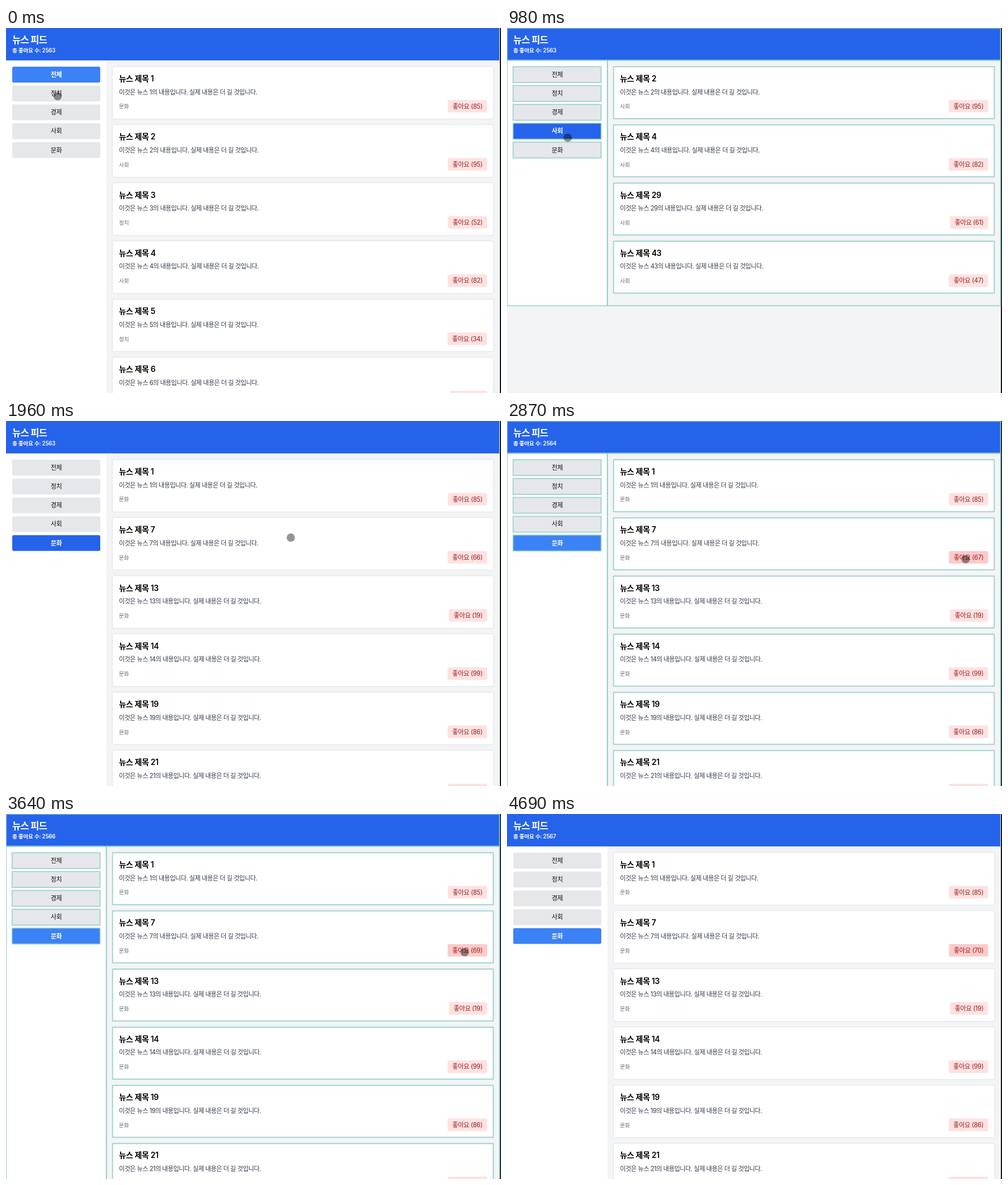
An HTML page that plays this animation: 872 by 642 pixels, repeating every 5.11 s.

```html
<!DOCTYPE html>
<html lang="ko">
<head>
<meta charset="utf-8">
<style>
html, body { margin: 0; width: 100%; height: 100%; overflow: hidden; background: #f3f4f6; }
svg { display: block; width: 872px; height: 642px; }
text { font-family: Inter, "Noto Sans CJK KR", "Noto Sans CJK", "Noto Sans KR", sans-serif; font-size: 11.04px; letter-spacing: -.025em; }
.logo { font-size: 16.5px; font-weight: 700; letter-spacing: -.04em; fill: #fff; }
.total { font-size: 9.66px; font-weight: 600; fill: #fff; }
.tab { text-anchor: middle; font-weight: 500; fill: #111; }
.tab.on { font-weight: 600; fill: #fff; }
.head { font-size: 13.8px; font-weight: 600; fill: #000; }
.body { letter-spacing: -.042em; fill: #303a48; }
.cat { font-size: 9.66px; fill: #646b78; }
.like { fill: #991b1b; }
.card { fill: #fff; filter: drop-shadow(0 .7px .9px rgba(0,0,0,.16)); }
.trace { fill: none; stroke: #8fcfc7; stroke-opacity: .88; stroke-width: 1.7; }
</style>
</head>
<body>
<svg viewBox="0 0 872 642">
  <rect width="872" height="642" fill="#f3f4f6"/>
  <g id="page"></g>
  <rect x="870" width="2" height="642" fill="#16181c"/>
  <g id="traces"></g>
  <circle id="dot" r="7.3" fill="#000" fill-opacity=".42"/>
</svg>
<script>
const LOOP = 5110, STEP = 70, SHOWN = 6;
const TABS = ['전체', '정치', '경제', '사회', '문화'];
// article number: likes, by category
const NEWS = {
  정치: { 3: 52, 5: 34, 6: 11, 9: 62, 12: 31, 15: 88 },
  경제: { 8: 45, 10: 73, 11: 28, 16: 90, 17: 56, 18: 64 },
  사회: { 2: 95, 4: 82, 29: 61, 43: 47 },
  문화: { 1: 85, 7: 66, 13: 19, 14: 99, 19: 86, 21: 54 }
};
const ALL = Object.entries(NEWS)
  .flatMap(([cat, items]) => Object.entries(items).map(([num, likes]) => ({ num: +num, likes, cat })))
  .sort((a, b) => a.num - b.num);
const FEEDS = TABS.map((name, i) => ALL.filter(n => !i || n.cat === name).slice(0, SHOWN));

const TAB_CLICKS = [490, 700, 980, 1750];
const LIKE_CLICKS = [0, 1, 2, 3].map(i => 2800 + 420 * i);
const TAB_LEAVE = 2030, LIKE_ENTER = 2730;
// pointer moves: start, duration, goal
const MOVES = [
  [0, 140, 105, 122], [420, 210, 105, 153], [840, 140, 107, 193], [1330, 210, 104, 210],
  [1750, 280, 508, 205], [2100, 560, 808, 243], [4060, 280, 483, 578], [4480, 210, 483, 660]
];

const $ = id => document.getElementById(id);
const page = $('page'), traces = $('traces'), dot = $('dot');
const passed = (times, t) => times.filter(v => t >= v).length;
const recent = (times, t, hold) => times.some(v => t >= v && t < v + hold);
const rect = (x, y, w, h, attrs) => `<rect x="${x}" y="${y}" width="${w}" height="${h}" ${attrs}/>`;
const text = (x, y, cls, s) => `<text x="${x}" y="${y}" class="${cls}">${s}</text>`;
const tabY = i => 68.1 + i * 33.15;
const cardY = i => 68.2 + i * 102.3;
const sideEnd = tab => Math.min(650, cardY(FEEDS[tab].length) + 11);

function drawTab(name, i, { tab, lit }) {
  const on = i === tab, y = tabY(i);
  const fill = on ? (lit ? '#2563eb' : '#3b82f6') : '#e5e7eb';
  return rect(11, y, 155, 27.9, `rx="2.8" fill="${fill}"`) +
    text(88.5, y + 17.9, on ? 'tab on' : 'tab', name);
}

function drawCard({ num, likes, cat }, i, s) {
  const y = cardY(i), liked = num === 7;
  const pill = liked && s.hover ? '#fecaca' : '#fee2e2';
  return rect(188, y, 670.5, 91.2, 'rx="2.8" class="card"') +
    text(199, y + 25.7, 'head', `뉴스 제목 ${num}`) +
    text(199, y + 48.3, 'body', `이것은 뉴스 ${num}의 내용입니다. 실제 내용은 더 길 것입니다.`) +
    text(199, y + 73.2, 'cat', cat) +
    `<g class="pill">${rect(0, y + 58.2, 70, 22.1, `rx="2.8" fill="${pill}"`)}` +
    text(0, y + 73.3, 'like', `좋아요 (${likes + (liked ? s.added : 0)})`) + '</g>';
}

function fitPill(g) {
  const [box, label] = g.children;
  const w = label.getComputedTextLength() + 16.6;
  box.setAttribute('x', 847.6 - w);
  box.setAttribute('width', w);
  label.setAttribute('x', 847.6 - w + 8.4);
}

function drawPage(s) {
  page.innerHTML =
    rect(0, 57, 177, sideEnd(s.tab) - 57, 'fill="#fff"') +
    rect(0, 0, 869, 57, 'fill="#2563eb"') +
    text(11, 27, 'logo', '뉴스 피드') +
    text(11, 43, 'total', `총 좋아요 수: ${2563 + s.added}`) +
    TABS.map((name, i) => drawTab(name, i, s)).join('') +
    FEEDS[s.tab].map((item, i) => drawCard(item, i, s)).join('');
  page.querySelectorAll('.pill').forEach(fitPill);
}

function drawTraces({ tab, trace }) {
  const h = sideEnd(tab) - 57, cls = 'class="trace"';
  traces.innerHTML = !trace ? '' :
    rect(.3, .3, 869.2, 56.2, cls) + rect(.3, 57, 176.5, h, cls) + rect(176.8, 57, 692.7, h, cls) +
    TABS.map((_, i) => rect(10.7, tabY(i), 155, 27.9, cls)).join('') +
    FEEDS[tab].map((_, i) => rect(187.7, cardY(i), 670.6, 91.2, cls)).join('');
}

function pointer(t) {
  let x = 91, y = 120;
  for (const [start, span, gx, gy] of MOVES) {
    const u = Math.min(1, Math.max(0, (t - start) / span));
    const e = 1 - (1 - u) ** 3;
    x += (gx - x) * e;
    y += (gy - y) * e;
  }
  return [x, y];
}

let last = '';
function render(ms) {
  const t = Math.floor((ms % LOOP) / STEP) * STEP;
  const s = {
    tab: passed(TAB_CLICKS, t),
    added: passed(LIKE_CLICKS, t),
    lit: t >= TAB_CLICKS[0] && t < TAB_LEAVE,
    hover: t >= LIKE_ENTER,
    trace: recent(TAB_CLICKS, t, 210) || recent(LIKE_CLICKS, t, 280)
  };
  const key = JSON.stringify(s);
  if (key !== last) {
    last = key;
    drawPage(s);
    drawTraces(s);
  }
  const [x, y] = pointer(t);
  dot.setAttribute('cx', x);
  dot.setAttribute('cy', y);
}

const start = performance.now();
function tick() {
  render(performance.now() - start);
  requestAnimationFrame(tick);
}
tick();
</script>
</body>
</html>
```
